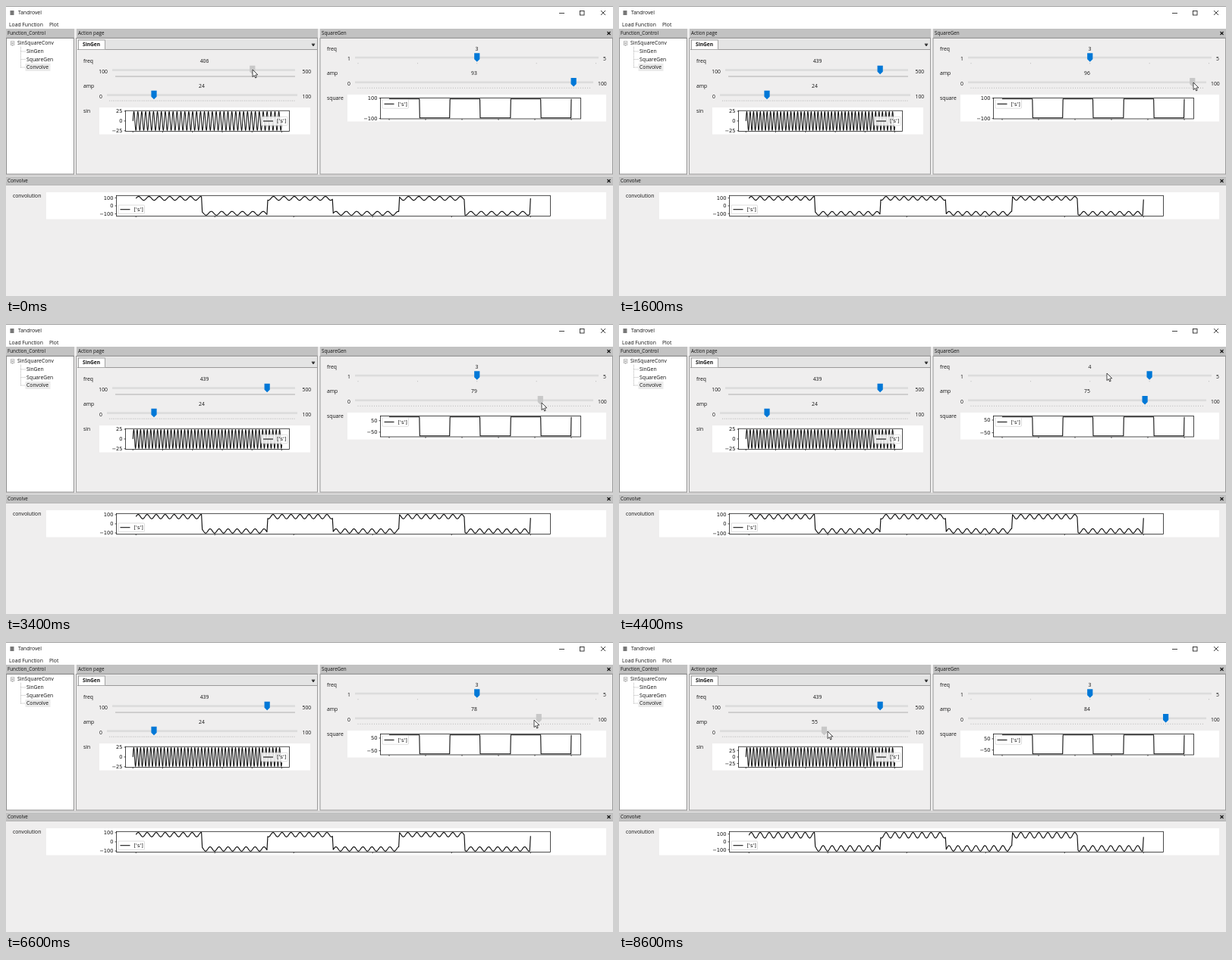
Animation of 800x383 px, one loop 8.8 s. Source, as an HTML page with a canvas:

```html
<!DOCTYPE html>
<html lang="en">
<head>
<meta charset="utf-8">
<title>Tandrovel</title>
<style>
html, body { margin: 0; width: 100%; height: 100%; overflow: hidden; background: #efeeee; }
canvas { display: block; width: 800px; height: 383px; }
</style>
</head>
<body>
<canvas id="stage"></canvas>
<script>
const W = 800, H = 383, LOOP = 8800, STEP = 200;
const cv = document.getElementById('stage');
const g = cv.getContext('2d');
const dpr = window.devicePixelRatio || 1;
cv.width = W * dpr;
cv.height = H * dpr;
g.scale(dpr, dpr);

const UI = '"Open Sans", "Noto Sans", sans-serif';
const PLOT = '"DejaVu Sans", sans-serif';

// Tracks: [step, value...], linear between keys
const pointer = [
  [0, 325, 84], [2, 345, 85], [3, 346, 86], [5, 435, 100], [6, 750, 71], [7, 749, 101],
  [9, 765, 101], [12, 728, 104], [15, 728, 104], [18, 695, 104], [19, 694, 104],
  [20, 650, 65], [22, 643, 65], [26, 709, 67], [28, 647, 67], [29, 640, 67], [30, 622, 68],
  [32, 692, 102], [33, 696, 103], [35, 723, 103], [37, 209, 115], [38, 200, 117],
  [39, 200, 117], [43, 275, 118]
];
const sinFreq = [[0, 406], [2, 439]];
const sinAmp = [[39, 24], [43, 55]];
const sqAmp = [[7, 93], [9, 98], [12, 86], [15, 86], [18, 75], [32, 75], [35, 84]];
// The plots trail behind the sliders
const drawnFreq = [[0, 380], [3, 439]];
const drawnAmp = [[39, 24], [43, 36]];

function at(track, k, i = 1) {
  if (k <= track[0][0]) return track[0][i];
  for (let n = 1; n < track.length; n++) {
    const a = track[n - 1], b = track[n];
    if (k <= b[0]) return a[i] + (b[i] - a[i]) * (k - a[0]) / (b[0] - a[0]);
  }
  return track[track.length - 1][i];
}
const within = (k, ranges) => ranges.some(([a, b]) => k >= a && k <= b);

function rect(x, y, w, h, fill) {
  g.fillStyle = fill;
  g.fillRect(x, y, w, h);
}
function frame(x, y, w, h, color, lw = 1) {
  g.strokeStyle = color;
  g.lineWidth = lw;
  g.strokeRect(x, y, w, h);
}
function line(color, lw, ...pts) {
  g.strokeStyle = color;
  g.lineWidth = lw;
  g.beginPath();
  for (let i = 0; i < pts.length; i += 2) g.lineTo(pts[i], pts[i + 1]);
  g.stroke();
}
function text(s, x, y, size = 6.8, align = 'left', font = UI, color = '#111', weight = '') {
  g.font = `${weight} ${size}px ${font}`;
  g.textAlign = align;
  g.textBaseline = 'alphabetic';
  g.fillStyle = color;
  g.fillText(s, x, y + size * 0.36);
}
function cross(x, y, r, lw) {
  line('#111', lw, x - r, y - r, x + r, y + r);
  line('#111', lw, x - r, y + r, x + r, y - r);
}
function header(s, x, y, w) {
  rect(x, y, w, 11.5, '#c2c2c2');
  line('#a8a8a8', 0.7, x, y + 11.5, x + w, y + 11.5);
  text(s, x + 2, y + 6, 6.3);
}

function windowChrome() {
  rect(0, 0, W, H, '#efeeee');
  rect(0, 0, W, 30, '#fff');
  rect(0, 0, W, 0.7, '#777');
  rect(5.5, 6, 5, 6, '#777');
  text('Tandrovel', 16, 9, 6.8);
  line('#111', 0.8, 729, 9.5, 736, 9.5);
  frame(756.5, 6.5, 5.5, 5.5, '#111', 0.8);
  cross(787, 9, 3, 0.8);
  text('Load Function', 4, 24.5, 6.8);
  text('Plot', 57, 24.5, 6.8);

  header('Function_Control', 0, 30, 90);
  header('Action page', 93, 30, 318);
  header('SquareGen', 414, 30, 386);
  header('Convolve', 0, 225, 800);
  cross(794.5, 36, 2, 1.1);
  cross(794.5, 231, 2, 1.1);

  rect(0, 42, 90, 180, '#fff');
  frame(0.5, 42.5, 89, 179.5, '#8c8c8c');
  frame(92.5, 42.5, 318, 179.5, '#9a9a9a');
  frame(414, 42.5, 385.5, 179.5, '#9a9a9a');
  line('#b4b4b4', 0.8, 0, 223.5, W, 223.5);
}

function tree() {
  g.setLineDash([1, 1]);
  line('#999', 0.7, 8.5, 52, 8.5, 54);
  line('#999', 0.7, 19.5, 54, 19.5, 81);
  for (const y of [60, 70.5, 81]) line('#999', 0.7, 19.5, y, 26, y);
  g.setLineDash([]);
  frame(6.3, 46.8, 4.6, 4.6, '#999', 0.7);
  line('#333', 0.7, 7.4, 49.1, 9.8, 49.1);
  rect(25.5, 76, 33, 10, '#ebebeb');
  text('SinSquareConv', 15, 49);
  text('SinGen', 27, 59.8);
  text('SquareGen', 27, 70.5);
  text('Convolve', 27, 81);
}

function tabs() {
  rect(94, 44, 316, 13, '#e4e4e4');
  line('#858585', 0.8, 94, 57.5, 410, 57.5);
  rect(95.5, 45, 35, 13, '#fff');
  frame(95.5, 45, 35, 12.5, '#858585', 0.7);
  text('SinGen', 101, 51, 6.6, 'left', UI, '#111', '700');
  g.fillStyle = '#111';
  g.beginPath();
  g.moveTo(402.8, 50.5);
  g.lineTo(407.2, 50.5);
  g.lineTo(405, 53.2);
  g.fill();
  line('#111', 0.7, 402.8, 50, 407.2, 50);
}

function slider(o, k, px, py) {
  const x = o.a + (o.b - o.a) * (o.value - o.min) / (o.max - o.min);
  text(o.name, o.nameX, o.y - o.up, 6.8);
  text(String(Math.round(o.value)), o.midX, o.y - o.up, 6.8, 'center');
  text(String(o.min), o.x0 - 6, o.y + 2, 6.8, 'right');
  text(String(o.max), o.maxX, o.y + 2, 6.8);
  rect(o.x0, o.y - 1.2, o.x1 - o.x0, 2.6, '#dcdcdc');
  const gap = (o.b - o.a) / o.ticks;
  if (gap < 1) rect(o.a - 1, o.y + 8, o.b - o.a + 2, 1, '#b0b0b0');
  else for (let i = 0; i <= o.ticks; i++) rect(o.a + i * gap - 0.4, o.y + 7, 0.8, 1.3, '#b8b8b8');

  const hover = Math.abs(px - x) < 4.5 && py > o.y - 6 && py < o.y + 6;
  g.fillStyle = within(k, o.held) ? '#c8c8c8' : hover ? '#171717' : '#0078d7';
  g.beginPath();
  g.moveTo(x - 3.6, o.y - 5.7);
  g.lineTo(x + 3.6, o.y - 5.7);
  g.lineTo(x + 3.6, o.y + 2.3);
  g.lineTo(x, o.y + 5.8);
  g.lineTo(x - 3.6, o.y + 2.3);
  g.fill();
}

// peak: largest value; f: value at u in 0..1
function plot(o, peak, f, samples = 500) {
  const [x0, x1, y0, y1] = o.axes;
  const mid = (y0 + y1) / 2, unit = (y1 - y0) / 2.2 / peak;
  rect(...o.paper, '#fff');
  g.lineJoin = 'round';
  g.strokeStyle = '#111';
  g.lineWidth = o.weight;
  g.beginPath();
  for (let i = 0; i <= samples; i++) {
    const u = i / samples;
    g.lineTo(o.from + (o.to - o.from) * u, mid - f(u) * unit);
  }
  g.stroke();
  g.lineJoin = 'miter';
  frame(x0, y0, x1 - x0, y1 - y0, '#111', 0.75);

  const step = [100, 50, 25].find(s => s <= peak * 1.1) || 10;
  for (const sign of o.signs) {
    const v = sign * step, y = mid - v * unit;
    line('#111', 0.7, x0 - 2, y, x0, y);
    text(String(v).replace('-', '\u2212'), x0 - 4, y, 6.7, 'right', PLOT);
  }
  for (let i = 0; i <= 5; i++) {
    const x = o.from + (o.to - o.from) * i / 5;
    line('#111', 0.7, x, y1, x, y1 + 1.8);
  }
  const [lx, ly] = o.legend;
  g.beginPath();
  g.roundRect(lx, ly, 34.5, 11.5, 1.2);
  g.fillStyle = 'rgba(255,255,255,.8)';
  g.fill();
  g.strokeStyle = '#d0d0d0';
  g.lineWidth = 0.7;
  g.stroke();
  line('#111', 1.1, lx + 2.5, ly + 5.7, lx + 15.5, ly + 5.7);
  text("['s']", lx + 20.5, ly + 5.7, 6.7, 'left', PLOT);
}

const sinPlot = {
  paper: [123, 134, 278, 35.5], axes: [157.5, 373.5, 138.2, 165.5], signs: [1, 0, -1],
  from: 167.3, to: 363.5, legend: [336.5, 146.3], weight: 1.05
};
const sqPlot = {
  paper: [450, 117, 341, 35.5], axes: [493.5, 757.5, 121.5, 149], signs: [1, -1],
  from: 505, to: 745, legend: [496, 123.7], weight: 1.1
};
const sumPlot = {
  paper: [53, 246, 738, 35.5], axes: [145.5, 717.5, 250.3, 277.5], signs: [1, 0, -1],
  from: 171.3, to: 691.3, legend: [148, 263], weight: 1.15
};

const left = { nameX: 102, maxX: 390.5 };
const right = { nameX: 423, midX: 617 };
const sliders = {
  sinFreq: { ...left, name: 'freq', midX: 261.5, y: 84.5, up: 11.5, x0: 140, x1: 381, a: 145, b: 380,
    min: 100, max: 500, ticks: 400, held: [[0, 2]] },
  sinAmp: { ...left, name: 'amp', midX: 258, y: 117.5, up: 12, x0: 133, x1: 384, a: 136.6, b: 380,
    min: 0, max: 100, ticks: 100, held: [[39, 43]] },
  sqFreq: { ...right, name: 'freq', midX: 620.5, maxX: 787, y: 68, up: 11.5, x0: 460, x1: 781, a: 464, b: 777.5,
    min: 1, max: 5, ticks: 4, held: [[26, 29]] },
  sqAmp: { ...right, name: 'amp', maxX: 780, y: 100.7, up: 11.7, x0: 460, x1: 774, a: 464, b: 769.5,
    min: 0, max: 100, ticks: 100, held: [[8, 12], [15, 18], [33, 35]] }
};

const square = (u, n) => (u * n + 1e-6) % 1 < 0.5 ? 1 : -1;
const wave = (u, n) => Math.sin(2 * Math.PI * n * u);

function arrow(x, y) {
  const pts = [0, 0, 0, 9.6, 2.2, 7.6, 3.7, 11, 5.2, 10.3, 3.8, 7.1, 6.8, 6.8];
  g.beginPath();
  for (let i = 0; i < pts.length; i += 2) g.lineTo(x + pts[i], y + pts[i + 1]);
  g.closePath();
  g.fillStyle = '#fff';
  g.fill();
  g.strokeStyle = '#111';
  g.lineWidth = 0.75;
  g.stroke();
}

function draw(k) {
  const px = at(pointer, k, 1), py = at(pointer, k, 2);
  const cycles = (a, b) => within(k, [[a, b]]) ? 4 : 3;
  windowChrome();
  tree();
  tabs();

  sliders.sinFreq.value = at(sinFreq, k);
  sliders.sinAmp.value = at(sinAmp, k);
  sliders.sqFreq.value = cycles(22, 27);
  sliders.sqAmp.value = at(sqAmp, k);
  for (const s of Object.values(sliders)) slider(s, k, px, py);

  text('sin', 102, 138.5);
  text('square', 423, 121.5);
  text('convolution', 9, 250.5);

  const a = at(drawnAmp, k), n = at(drawnFreq, k) / 10;
  plot(sinPlot, a, u => a * wave(u, n), 1000);
  const b = at(sqAmp, k - 1), m = cycles(24, 28);
  plot(sqPlot, b, u => b * square(u, m));
  const c = at(sqAmp, k), q = cycles(23, 27);
  plot(sumPlot, a + c, u => c * square(u, q) + a * wave(u, n));

  arrow(px, py);
}

const start = performance.now();
function tick() {
  const t = (performance.now() - start) % LOOP;
  draw(Math.floor(t / STEP));
  requestAnimationFrame(tick);
}
tick();
</script>
</body>
</html>
```
